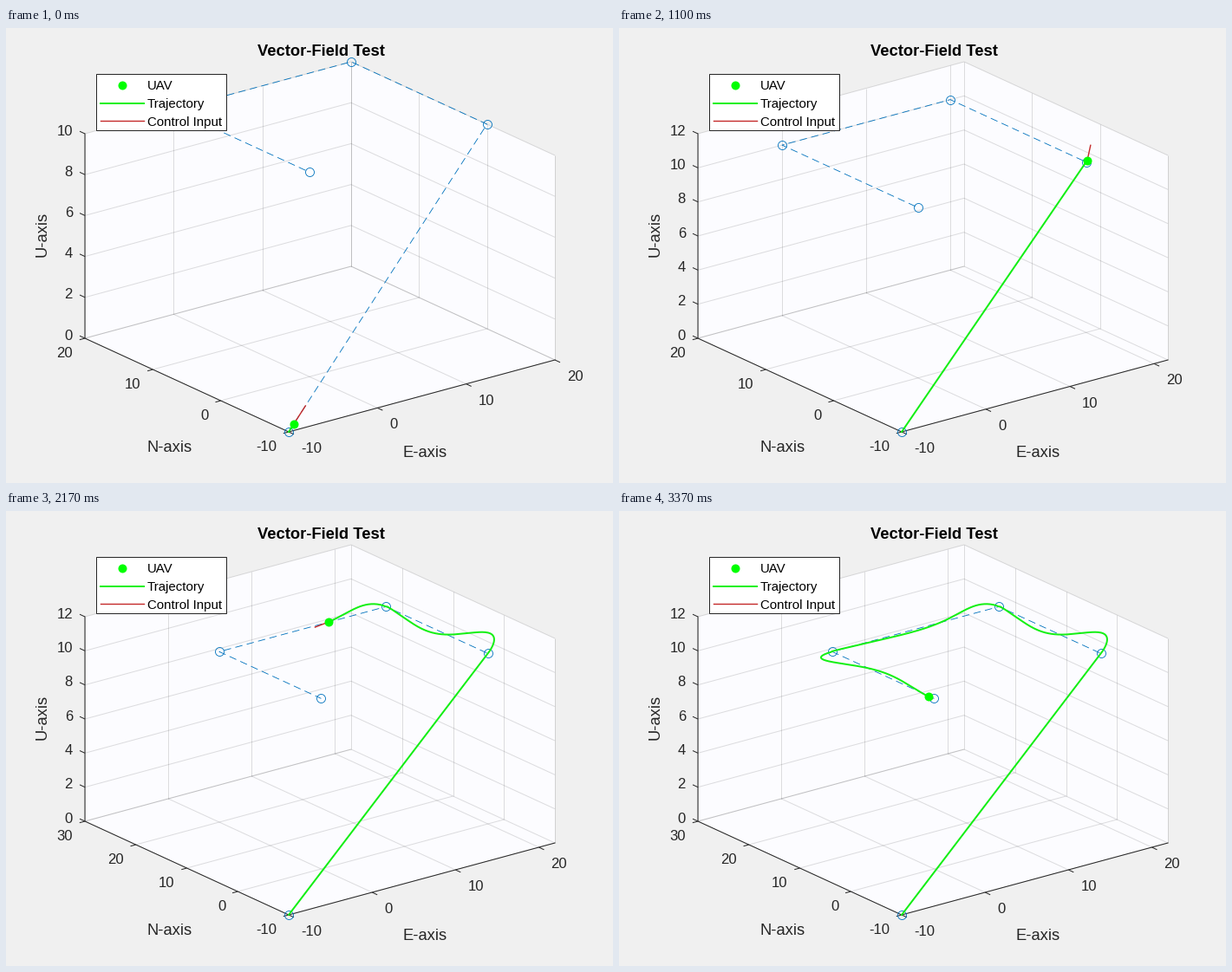
A matplotlib script for the animation above (3410 ms loop, 700 by 525 pixels).

```python
import numpy as np
import matplotlib.pyplot as plt
from matplotlib.animation import FuncAnimation
from matplotlib.collections import LineCollection
from matplotlib.patches import Polygon, Rectangle

W, H = 700, 525
TICK_MS, LOOP_MS, STEPS = 10, 3410, 102
PT = 0.72  # points per pixel at 100 dpi

# Oblique view of the plot box: front corner and the E, N, U edges in pixels
CORNER = np.array([326, 466])
EDGES = np.array([[307, -83], [-235, -108], [0, -236]])
LOW = np.array([-10, -10, 0])
STEP = np.array([10, 10, 2])

BG, WALL, INK = "#f0f0f0", "#fcfcff", "#262626"
BLUE, GREEN, TRAIL, RED = "#0072bd", "#00ff00", "#14f014", "#c42a2a"
GRID = (0.15, 0.15, 0.15, 0.15)

WAYPOINTS = np.array([[-10, -10, 0], [20, 0, 10], [20, 20, 10],
                      [0, 20, 10], [0, 0, 10]])

# Flight model, in units per step: the craft picks up speed along each leg
# while the motion left over from the leg before swings out and dies away
SPEED, LAG, LEAD_IN, BRAKE = 1.05, 4.1, 2.9, 1.4
SWING, DAMPING = 0.3, 0.125
REACH = 2

legs = np.diff(WAYPOINTS, axis=0)
lengths = np.linalg.norm(legs, axis=1)
heads = legs / lengths[:, None]
before = np.vstack([np.zeros(3), heads[:-1]])
lags = LAG * (1 - (before * heads).sum(axis=1))  # sharp turns cost more time
starts = np.cumsum(np.r_[-LEAD_IN, (lengths / SPEED + lags)[:-1]])


def flight(t):
    k = np.searchsorted(starts, t, side="right") - 1
    s = t - starts[k]
    rest = lengths[k] - SPEED * (s - lags[k] * (1 - np.exp(-s / lags[k])))
    if k == len(legs) - 1:
        rest = BRAKE * np.logaddexp(0, rest / BRAKE)
    swing = SPEED / SWING * np.exp(-DAMPING * s) * np.sin(SWING * s)
    return WAYPOINTS[k + 1] - heads[k] * rest + before[k] * swing


def arrow_tip(t):
    """End of the control arrow, which leads the motion by one step."""
    p = flight(t)
    aim = flight(t + 1.5) - flight(t + 0.5)
    reach = min(REACH, np.linalg.norm(WAYPOINTS[-1] - p))
    return p + reach * aim / np.linalg.norm(aim)


FINE = 4
dense = np.array([flight(j / FINE) for j in range((STEPS - 1) * FINE + 1)])
path = dense[::FINE]
tips = np.array([arrow_tip(i) for i in range(STEPS)])

# Axis limits follow the data until they snap to the next tick
peak = np.maximum(np.maximum.accumulate(np.maximum(path, tips)), [20, 20, 10])
base = np.floor(peak / STEP) * STEP
limits = np.where(peak - base < 0.21 * STEP, peak, base + STEP)


def project(points, high):
    return CORNER + (np.asarray(points) - LOW) / (high - LOW) @ EDGES


def ticks(axis, high):
    return np.arange(LOW[axis], high[axis] + 1e-9, STEP[axis])


def edge_point(axis, value, high):
    """Point on the ruled edge of an axis."""
    p = LOW.astype(float)
    if axis == 2:
        p[1] = high[1]
    p[axis] = value
    return project(p, high)


fig = plt.figure(figsize=(W / 100, H / 100), dpi=100, facecolor=BG)
ax = fig.add_axes([0, 0, 1, 1])
ax.set_xlim(0, W)
ax.set_ylim(H, 0)
ax.axis("off")


def label(x, y, text, px, ha="center", color=INK, **kw):
    """Text whose capitals are centred on y."""
    return ax.text(x, y + 0.36 * px, text, fontsize=px * PT, ha=ha, va="baseline",
                   family="Liberation Sans", color=color, **kw)


def line(color, px, z, **kw):
    return ax.plot([], [], color=color, lw=px * PT, zorder=z, **kw)[0]


hull = [(91, 358), (326, 466), (633, 383), (633, 147), (398, 39), (91, 122)]
ax.add_patch(Polygon(hull, fc=WALL, ec="none", zorder=0))
grid = LineCollection([], colors=[GRID], linewidths=PT, zorder=1)
marks = LineCollection([], colors=[INK], linewidths=PT, zorder=2)
ax.add_collection(grid)
ax.add_collection(marks)
ax.plot([91, 91, 326, 633], [122, 358, 466, 383], color=INK, lw=PT, zorder=2)

route = line(BLUE, 0.85, 3, dashes=(10, 6), dash_capstyle="butt")
rings = line(BLUE, 1, 3, ls="none", marker="o", ms=10 * PT, mfc="none", mew=0.85 * PT)
trail = line(TRAIL, 2, 4, solid_joinstyle="round")
control = line(RED, 1.4, 5, solid_capstyle="butt")
uav = line(GREEN, 1, 6, ls="none", marker="o", ms=10 * PT, mew=0)

label(363, 25, "Vector-Field Test", 18.33, color="black", weight="bold")
label(189, 482, "N-axis", 18.33)
label(483, 488, "E-axis", 18.33)
ax.text(47, 238, "U-axis", fontsize=18.33 * PT, family="Liberation Sans", color=INK,
        rotation=90, rotation_mode="anchor", ha="center", va="baseline")

ax.add_patch(Rectangle((104, 53), 150, 65, fc="white", ec=INK, lw=PT, zorder=8))
ax.plot([134], [65.5], "o", color=GREEN, ms=10 * PT, mew=0, zorder=9)
ax.plot([109, 159], [86.5, 86.5], color=TRAIL, lw=2 * PT, zorder=9)
ax.plot([109, 159], [107, 107], color=RED, lw=1.4 * PT, zorder=9)
for row, name in enumerate(("UAV", "Trajectory", "Control Input")):
    label(163, 65.5 + 21 * row, name, 15, ha="left", color="black", zorder=9)

# Per axis: tick direction, label offset, alignment
STYLE = [((6, 2.8), (14, 18), "left"),
         ((-6.2, 1.7), (-14, 16), "right"),
         ((-6, -2.8), (-14, -4.5), "right")]
TEXT_PX = 16.67
numbers = [[label(0, 0, "", TEXT_PX, ha=s[2]) for _ in range(8)] for s in STYLE]


def draw_axes(high):
    e1, n1, u1 = high
    e0, n0, u0 = LOW
    rules, stubs = [], []
    for e in ticks(0, high):
        rules.append([(e, n0, u0), (e, n1, u0)])
        rules.append([(e, n1, u0), (e, n1, u1)])
    for n in ticks(1, high):
        rules.append([(e0, n, u0), (e1, n, u0)])
        rules.append([(e1, n, u0), (e1, n, u1)])
    for u in ticks(2, high):
        rules.append([(e0, n1, u), (e1, n1, u)])
        rules.append([(e1, n0, u), (e1, n1, u)])
    grid.set_segments(list(project(rules, high)))

    for axis, (stub, shift, _) in enumerate(STYLE):
        values = ticks(axis, high)
        for k, text in enumerate(numbers[axis]):
            text.set_visible(k < len(values))
            if k < len(values):
                p = edge_point(axis, values[k], high)
                stubs.append([p, p + stub])
                text.set_position(p + shift + (0, 0.36 * TEXT_PX))
                text.set_text(f"{values[k]:.0f}")
    marks.set_segments(stubs)


def update(tick):
    # Steps last a third of 100 ms, rounded to whole ticks
    i = min(int((3 * tick + 1.5) / 10), STEPS - 1)
    high = limits[i]
    draw_axes(high)
    way = project(WAYPOINTS, high).T
    route.set_data(*way)
    rings.set_data(*way)
    flown = np.vstack([WAYPOINTS[:1], dense[:i * FINE + 1]])
    trail.set_data(*project(flown, high).T)
    control.set_data(*project([path[i], tips[i]], high).T)
    uav.set_data(*project(path[i:i + 1], high).T)
    return []


anim = FuncAnimation(fig, update, frames=LOOP_MS // TICK_MS, interval=TICK_MS,
                     repeat=True, repeat_delay=0, blit=False)
plt.show()
```
